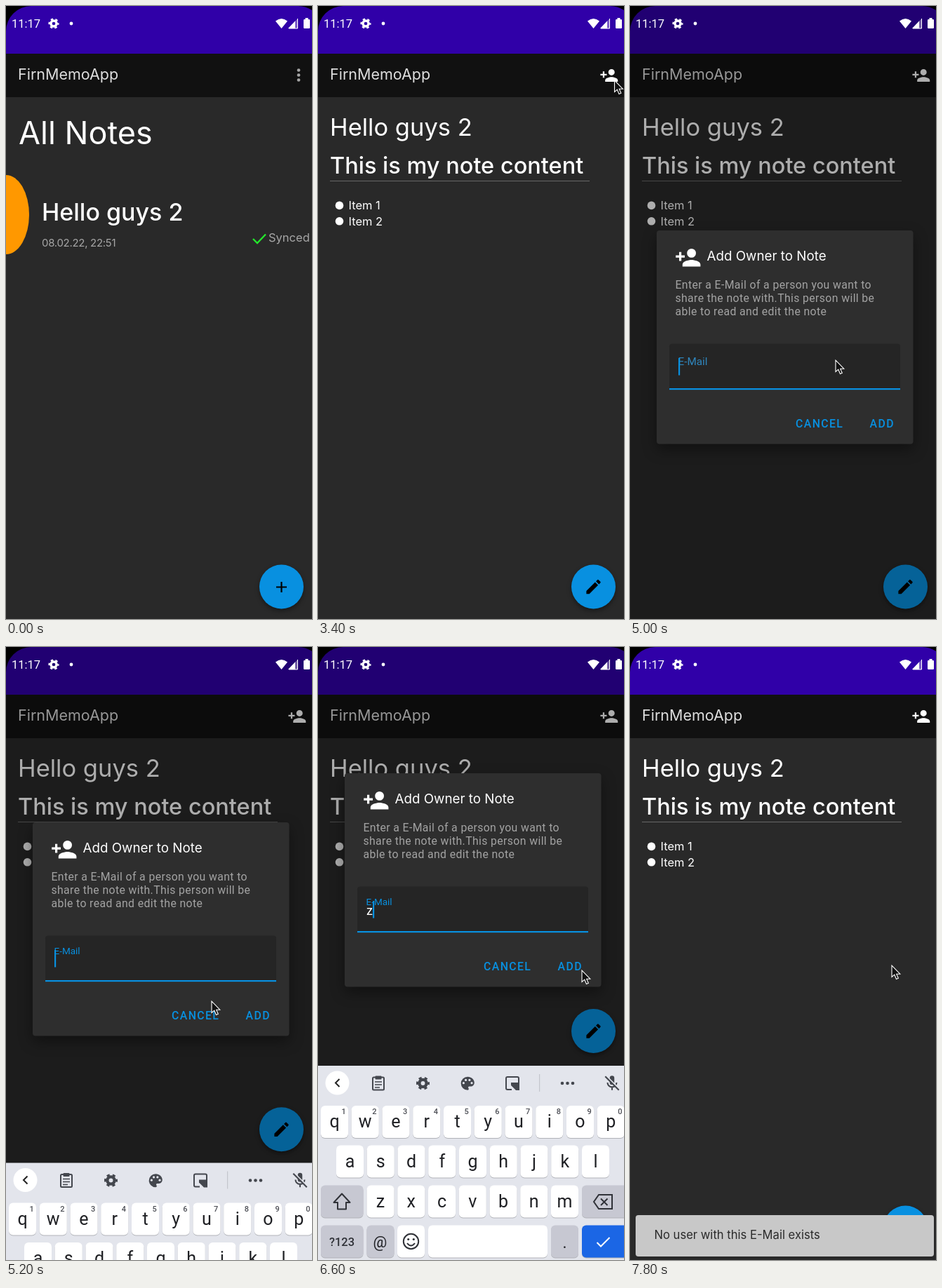
Write an HTML page that moves like this. It is 436 by 874 pixels and loops after 8 s.

```html
<!DOCTYPE html>
<html lang="en">
<head>
<meta charset="utf-8">
<title>Note sharing</title>
<style>
  html, body { margin: 0; width: 100%; height: 100%; overflow: hidden; background: #292929; }
  svg { display: block; width: 436px; height: 874px; }
  text { white-space: pre; }
  .ui { font-family: Inter, "Open Sans", sans-serif; }
  .sys { font-family: Roboto, "Liberation Sans", sans-serif; }
  .fab { filter: drop-shadow(0 3px 3px rgba(0,0,0,.4)); }
  .card { filter: drop-shadow(0 8px 10px rgba(0,0,0,.4)); }
  .key { filter: drop-shadow(0 1px 0 rgba(0,0,0,.22)); }
</style>
</head>
<body>
<svg id="stage" viewBox="0 0 436 874" xmlns="http://www.w3.org/2000/svg"></svg>
<script>
const LOOP = 8000, STEP = 200;
const BLUE = '#0890e0', INK = '#44474e', KEYBOARD = '#e3e5ec', MOD = '#c7c8d2';

const text = (x, y, s, size, fill = '#fff', more = '', font = 'ui') =>
  `<text class="${font}" x="${x}" y="${y}" font-size="${size}" fill="${fill}" ${more}>${s}</text>`;
const sys = (x, y, s, size, fill, more = '') => text(x, y, s, size, fill, more, 'sys');
const rect = (x, y, w, h, fill, r = 0, more = '') =>
  `<rect x="${x}" y="${y}" width="${w}" height="${h}" rx="${r}" fill="${fill}" ${more}/>`;
const dot = (x, y, r, fill) => `<circle cx="${x}" cy="${y}" r="${r}" fill="${fill}"/>`;
const line = (d, stroke, width, more = '') =>
  `<path d="${d}" fill="none" stroke="${stroke}" stroke-width="${width}" ${more}/>`;
const group = (id, body, more = '') => `<g id="${id}" ${more}>${body}</g>`;
const at = (x, y, scale, body) => `<g transform="translate(${x} ${y}) scale(${scale})">${body}</g>`;

const gear = (x, y, scale, color) => at(x, y, scale,
  `<circle r="5.2" fill="none" stroke="${color}" stroke-width="4.4"/>` +
  `<circle r="8" fill="none" stroke="${color}" stroke-width="3.4" stroke-dasharray="4.2 4.178" stroke-dashoffset="2.1"/>`);
const addPerson = (x, y, scale) => at(x, y, scale,
  `<path fill="#fff" d="M15 12a4 4 0 1 0 0-8 4 4 0 0 0 0 8zM6 10V7H4v3H1v2h3v3h2v-3h3v-2zM15 14c-2.67 0-8 1.34-8 4v2h16v-2c0-2.66-5.33-4-8-4z"/>`);

function statusBar() {
  const white = '#fff';
  return sys(8, 31, '11:17', 16.5, white) + gear(68, 25, .78, white) + dot(93, 25, 2.4, white) +
    `<path fill="${white}" d="M384 21.5Q392.500 14.500 401 21.500L392.500 32Z"/>` +
    `<path fill="${white}" opacity=".35" d="M416 17.500V32H402Z"/>` +
    `<path fill="${white}" d="M412 21.600V32H402Z"/>` + line('M415.5 18V32H403', white, 1) +
    rect(424, 19, 9, 13, white, 1.2) + rect(426.5, 17, 4, 3, white);
}

function listScreen() {
  const dots = [91.5, 98.5, 105.5].map(y => dot(417, y, 2.3, '#a5a5a5')).join('');
  return dots + text(18, 197, 'All Notes', 45) +
    '<ellipse cx="0" cy="297.500" rx="33" ry="56.500" fill="#ff9800"/>' +
    text(51, 306, 'Hello guys 2', 34, '#fff', 'font-weight="500"') +
    text(51, 343, '08.02.22, 22:51', 15, '#a6a6a6', 'letter-spacing="-.3"') +
    line('M352 332L358 338L370 325.5', '#24e62c', 2.4) +
    text(374, 335.5, 'Synced', 16.5, '#a6a6a6');
}

function noteScreen() {
  const items = [1, 2].map(n => {
    const y = 262 + n * 22.4;
    return dot(30.5, y, 5.8, '#fff') + text(43.5, y + 5.7, 'Item ' + n, 16.5);
  }).join('');
  return addPerson(401.3, 85.4, 1.127) + text(17, 185, 'Hello guys 2', 34.5) +
    text(17, 239, 'This is my note content', 32.5, '#fff', 'font-weight="500"') +
    rect(17, 249, 370, 1, '#686868') + items;
}

function fab() {
  const pencil = at(379, 814.5, 1.127,
    '<path d="M3 17.250V21h3.750L17.810 9.940l-3.750-3.750zM20.710 7.040a1 1 0 0 0 0-1.410l-2.340-2.340a1 1 0 0 0-1.410 0l-1.830 1.830 3.750 3.750z"/>');
  return `<circle class="fab" cx="392.500" cy="828" r="31.500" fill="${BLUE}"/>` +
    group('plus', line('M385 828.5H400M392.5 821V836', '#000', 2.2)) + group('pencil', pencil);
}

function dialog() {
  const info = ['Enter a E-Mail of a person you want to',
    'share the note with.This person will be',
    'able to read and edit the note'];
  const button = (x, s) =>
    sys(x, 601, s, 15.8, BLUE, 'font-weight="500" letter-spacing="1.41"');
  return rect(38, 320, 365.5, 304.5, '#2e2e2e', 4, 'class="card"') +
    addPerson(63.6, 339.6, 1.6) + text(109.5, 363, 'Add Owner to Note', 18.8) +
    info.map((s, i) => sys(64.5, 403 + i * 19, s, 15.8, '#a3a3a3', 'letter-spacing=".38"')).join('') +
    '<path fill="#252525" d="M56 547V485.500a4 4 0 0 1 4-4H381a4 4 0 0 1 4 4V547Z"/>' +
    group('underline', rect(56, 545, 329, 2.2, BLUE)) +
    group('idleLine', rect(56, 546, 329, 1, '#868686')) +
    `<text id="label" class="sys" x="68.500">E-Mail</text>` +
    group('typed', sys(69, 521.5, 'z', 18, '#fff')) +
    rect(69, 502, 2.2, 24.5, BLUE, 0, 'id="caret"') +
    button(236, 'CANCEL') + button(341.5, 'ADD');
}

function keyboard() {
  const pitch = 43.75;
  const key = (x, y, w = 39, fill = '#fff') => rect(x, y, w, 46, fill, 6, 'class="key"');
  const middle = 'text-anchor="middle"';
  const row = (letters, x, y) => [...letters].map((c, i) =>
    key(x + i * pitch, y) + sys(x + 19.5 + i * pitch, y + 31, c, 25, '#1f2024', middle)).join('');
  const hints = [...'1234567890'].map((c, i) =>
    sys(36.7 + i * pitch, 666, c, 11, '#4c4e55', middle + ' font-weight="500"')).join('');

  const clipboard = rect(78, 613.5, 16, 18, 'none', 1.5, `stroke="${INK}" stroke-width="2"`) +
    rect(81.5, 611.5, 9, 5, INK, 1) + line('M81 620H91M81 624H91M81 628H88', INK, 1.7);
  const palette = at(200.5, 609.5, 1.06,
    `<path fill="${INK}" d="M12 3a9 9 0 0 0 0 18c1.500 0 1.900-1.500 1.100-2.500-.9-1.200 0-2.500 1.100-2.500H16c2.760 0 5-2.240 5-5 0-4.420-4.030-8-9-8z"/>` +
    dot(6.5, 11.5, 1.5, KEYBOARD) + dot(9.5, 7.5, 1.5, KEYBOARD) +
    dot(14.5, 7.5, 1.5, KEYBOARD) + dot(17.5, 11.5, 1.5, KEYBOARD));
  const sticker = line('M276 631H270Q268 631 268 629V615Q268 613 270 613H284Q286 613 286 615V622', INK, 2) +
    `<path fill="${INK}" d="M287 621V632H282L275 625V621Z"/>`;
  const mic = at(406, 609, 1.08,
    `<path fill="${INK}" d="M9 5a3 3 0 0 1 6 0v6a3 3 0 0 1-6 0z"/>` +
    line('M6 11a6 6 0 0 0 12 0M12 17V21', INK, 1.9) +
    line('M4.5 2.5L22 20', KEYBOARD, 2) + line('M3 3L21 21', INK, 2));
  const tools = dot(27.5, 621.5, 17, '#fff') + line('M30.5 616L25 621.5L30.500 627', '#222', 2) +
    clipboard + gear(149.5, 622, .98, INK) + palette + sticker +
    rect(315, 609, 1.2, 25, '#c3c5cc') +
    [348, 355.5, 363].map(x => dot(x, 622, 2.3, INK)).join('') + mic;

  const shift = line('M34 779.500L22.500 792H28V801.500H40V792H45.500Z', '#303238', 2, 'stroke-linejoin="round"');
  const erase = line('M400 781H419V801H400L393 791ZM403 786.500L412.500 796M412.500 786.500L403 796', '#303238', 2);
  const smile = '<circle cx="132.500" cy="847.500" r="10.700" fill="none" stroke="#303238" stroke-width="2"/>' +
    dot(128.7, 844.5, 1.6, '#303238') + dot(136.3, 844.5, 1.6, '#303238') +
    line('M127 850Q132.500 857 138 850', '#303238', 2);

  return rect(0, 597, 436, 277, KEYBOARD) + tools +
    row('qwertyuiop', 4, 654) + hints + row('asdfghjkl', 26, 710.5) +
    key(4, 767.5, 60.5, MOD) + shift + row('zxcvbnm', 69.5, 767.5) + key(376, 767.5, 70, MOD) + erase +
    key(4, 824.5, 60.5, MOD) + sys(34, 854, '?123', 16.5, '#303238', middle + ' font-weight="500"') +
    key(69.5, 824.5, 39, MOD) + sys(88.5, 856, '@', 22, '#1f2024', middle) +
    key(113, 824.5) + smile + key(157, 824.5, 170) +
    key(332, 824.5, 39, MOD) + sys(351.5, 857, '.', 23, '#1f2024', middle) +
    key(376, 824.5, 70, '#1b66e5') + line('M397.500 849L403 854.500L415.500 842', '#fff', 2);
}

const stage = document.getElementById('stage');
stage.innerHTML =
  rect(0, 0, 436, 874, '#292929') + rect(0, 0, 436, 68, '#3000a8') + rect(0, 68, 436, 62, '#111') +
  text(17, 104.5, 'FirnMemoApp', 21.5, '#dedede') +
  group('list', listScreen()) + group('note', noteScreen()) + group('fab', fab()) +
  group('snackbar', rect(8, 810, 425, 59, '#c8c8c8', 4) +
    text(34.5, 843.5, 'No user with this E-Mail exists', 16.6, '#2b2b2b')) +
  rect(0, 0, 436, 874, '#000', 0, 'id="dim"') +
  group('dialog', dialog()) + group('keyboard', keyboard()) + statusBar() +
  '<path d="M0 0V36A36 36 0 0 1 36 0ZM416 0A36 36 0 0 1 436 6V0Z"/>' +
  group('pointer', '<path d="M0 0V16.500L3.800 13.200L6.500 19.500L9.300 18.300L6.700 12.200H11.800Z" fill="#111" stroke="#fff" stroke-width="1.100"/>');

const el = {};
stage.querySelectorAll('[id]').forEach(node => el[node.id] = node);

const clamp = v => Math.min(1, Math.max(0, v));
const ramp = (t, from, to) => clamp((t - from) / (to - from));
const smooth = v => v * v * (3 - 2 * v);
const mix = (a, b, p) => a + (b - a) * p;
const show = (node, on) => node.setAttribute('display', on ? 'inline' : 'none');
const fade = (node, v) => { node.setAttribute('opacity', v); show(node, v > 0); };
const move = (node, x, y) => node.setAttribute('transform', `translate(${x} ${y})`);

// time, x, y of the pointer tip
const route = [
  [1400, 309, 601], [1600, 309, 601], [1800, 326, 416], [2000, 326, 416],
  [2200, 378, 312], [2400, 356, 302], [2800, 356, 302], [3400, 422.5, 106],
  [4200, 422.5, 106], [4800, 293, 505], [6400, 293, 505], [6600, 376, 461],
  [6800, 376, 461], [7000, 373, 454]
];
function pointerAt(t) {
  const next = route.findIndex(p => p[0] > t);
  if (next < 0) return route[route.length - 1].slice(1);
  const a = route[Math.max(0, next - 1)], b = route[next];
  const p = smooth(ramp(t, a[0], b[0]));
  return [mix(a[1], b[1], p), mix(a[2], b[2], p)];
}

function draw(time) {
  const t = Math.floor((time % LOOP) / STEP) * STEP;
  const opened = t >= 2800;
  show(el.list, !opened);
  show(el.plus, !opened);
  show(el.note, opened);
  show(el.pencil, opened);

  const modal = ramp(t, 4300, 4550) * (1 - ramp(t, 6900, 7150));
  fade(el.dim, .32 * modal);
  fade(el.dialog, modal);

  const lift = smooth(ramp(t, 5000, 5400)) * (1 - smooth(ramp(t, 6900, 7300)));
  move(el.fab, 0, -280.5 * lift);
  move(el.dialog, 0, -140 * lift);
  move(el.keyboard, 0, 277 * (1 - lift));
  show(el.keyboard, lift > 0);

  const focus = ramp(t, 4800, 5133), focused = focus > 0, typed = t >= 5800;
  el.label.setAttribute('font-size', mix(18, 13.5, focus));
  el.label.setAttribute('y', mix(519, 508, focus));
  el.label.setAttribute('fill', focus === 1 ? BLUE : focused ? '#2f86bd' : '#a3a3a3');
  show(el.underline, focused);
  show(el.idleLine, !focused);
  show(el.caret, focused);
  show(el.typed, typed);
  el.caret.setAttribute('x', typed ? 78 : 69);

  const snack = ramp(t, 7500, 7700), size = mix(.8, 1, snack);
  fade(el.snackbar, snack);
  el.snackbar.setAttribute('transform',
    `translate(220.5 839.5) scale(${size}) translate(-220.5 -839.5)`);

  show(el.pointer, t >= 1400);
  move(el.pointer, ...pointerAt(t));
}

const start = performance.now();
(function tick() {
  draw(Math.max(0, performance.now() - start));
  requestAnimationFrame(tick);
})();
</script>
</body>
</html>
```
